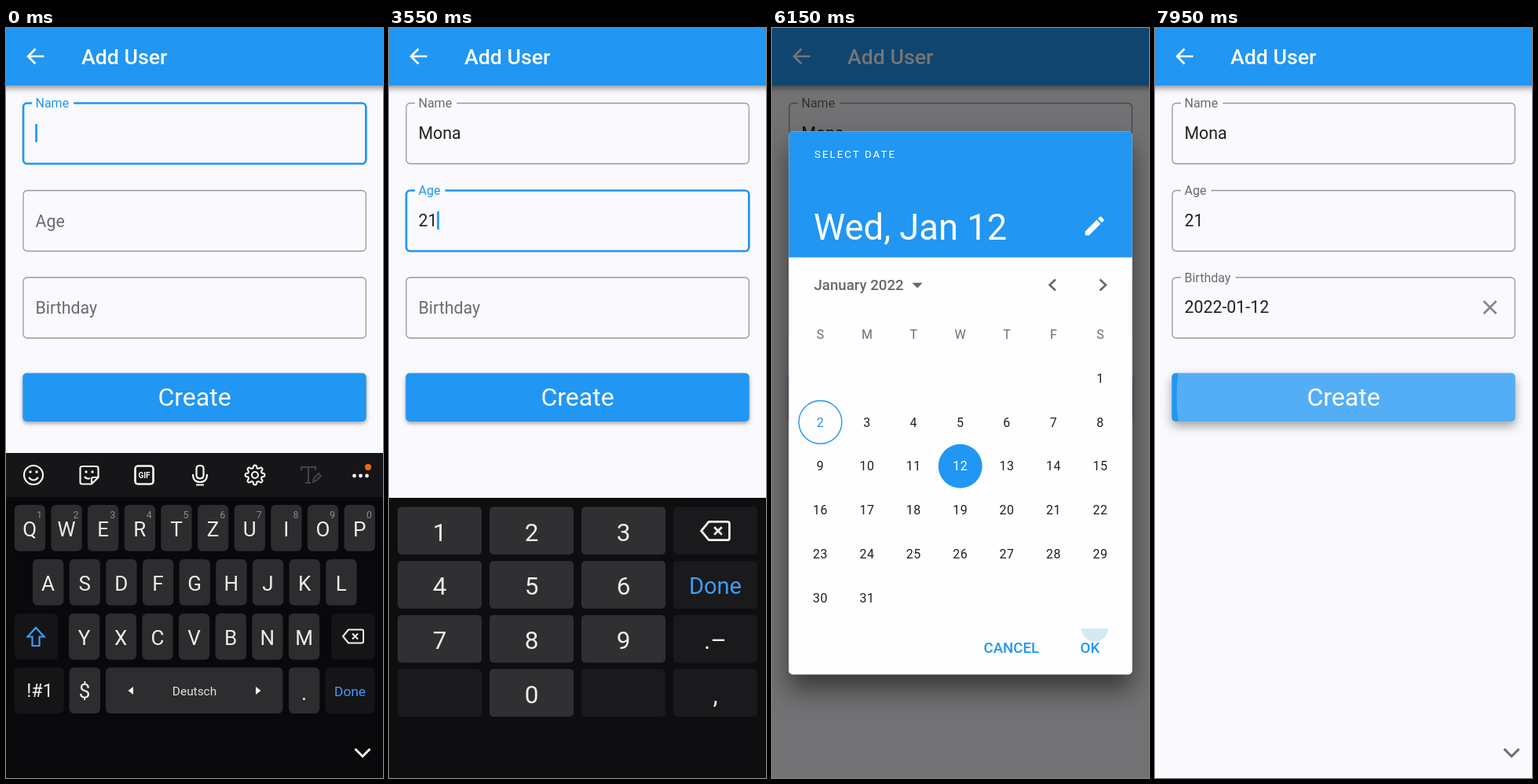
These frames come from a looping animation (480 by 953 pixels, 8000 ms). An HTML page with a canvas:

```html
<!DOCTYPE html>
<html lang="en">
<head>
<meta charset="utf-8">
<title>Add User</title>
<style>
html, body { margin: 0; height: 100%; overflow: hidden; background: #faf9fd; }
canvas { display: block; width: 100vw; height: 100vh; }
</style>
</head>
<body>
<canvas id="stage" width="480" height="953"></canvas>
<script>
const c = document.getElementById('stage').getContext('2d');
const BLUE = '#2196f3', BG = '#faf9fd', INK = '#212121', GREY = '#6c6b6e';
const LOOP = 8000, NAME = 'Mona', AGE = '21';
const KEY = '#2d2c2f', DARK_KEY = '#151417', HELD = '#5f5f61';

// Each press: key, down, up
const letterPresses = [['m', 60, 200], ['o', 500, 620], ['n', 900, 1020], ['a', 1230, 1350]];
const digitPresses = [['2', 2480, 2550], ['1', 2780, 2850]];
const TAP_AGE = 1700, OPEN = 3600, PICK = 4880, CLOSE = 6160, PRESS = 7050;
const cursorResets = [0, 200, 620, 1020, 1350, TAP_AGE, 2550, 2850, 3500];

const lerp = (a, b, p) => a + (b - a) * p;
const ramp = (t, from, to) => Math.min(1, Math.max(0, (t - from) / (to - from)));
const easeOut = p => 1 - (1 - p) ** 2;
const easeInOut = p => p * p * (3 - 2 * p);
const typed = (presses, t) => presses.filter(p => t >= p[2]).length;
const heldKey = (presses, t, linger = 0) => (presses.find(p => t >= p[1] && t < p[2] + linger) || [])[0];

function setFont(size, weight = 400, spacing = 0) {
  c.font = `${weight} ${size}px Roboto, sans-serif`;
  c.letterSpacing = spacing + 'px';
}
// y is the middle of the capital letters
function text(s, x, y, size, color, align = 'left', weight = 400, spacing = 0) {
  setFont(size, weight, spacing);
  c.textAlign = align;
  c.fillStyle = color;
  c.fillText(s, x, y + size * 0.355);
}
function width(s, size) {
  setFont(size);
  return c.measureText(s).width;
}
function box(x, y, w, h, r, color) {
  c.beginPath();
  c.roundRect(x, y, w, h, r);
  c.fillStyle = color;
  c.fill();
}
function disc(x, y, r, color) {
  c.beginPath();
  c.arc(x, y, r, 0, 7);
  c.fillStyle = color;
  c.fill();
}
function ring(x, y, r, color, w) {
  c.beginPath();
  c.arc(x, y, r, 0, 7);
  c.strokeStyle = color;
  c.lineWidth = w;
  c.stroke();
}
function path(d, x, y, color, w) {
  c.save();
  c.translate(x, y);
  c.strokeStyle = color;
  c.lineWidth = w;
  c.stroke(new Path2D(d));
  c.restore();
}
function fillPath(d, x, y, color, scale = 1) {
  c.save();
  c.translate(x, y);
  c.scale(scale, scale);
  c.fillStyle = color;
  c.fill(new Path2D(d));
  c.restore();
}
function shadow(color, blur, dy, draw) {
  c.save();
  c.shadowColor = color;
  c.shadowBlur = blur;
  c.shadowOffsetY = dy;
  draw();
  c.restore();
}
function layer(alpha, draw) {
  if (alpha <= 0) return;
  c.save();
  c.globalAlpha = alpha;
  draw();
  c.restore();
}

function field(top, label, value, focused, float, t, composing) {
  const color = focused ? BLUE : GREY;
  c.beginPath();
  c.roundRect(22, top + 0.5, 436.3, 77, 5);
  c.strokeStyle = focused ? BLUE : '#99989b';
  c.lineWidth = focused ? 2.7 : 1.3;
  c.stroke();
  if (float) {
    c.fillStyle = BG;
    c.fillRect(33, top - 2, (width(label, 16) + 10.5) * float, 5);
  }
  text(label, 37.5, lerp(top + 39, top + 0.5, float), lerp(21.33, 16, float), color);
  const mid = top + 38, end = 37.5 + width(value, 21.33);
  text(value, 37.5, mid, 21.33, INK);
  if (composing && value) {
    c.fillStyle = INK;
    c.fillRect(37.5, mid + 9.5, end - 37.5, 1.3);
  }
  const reset = cursorResets.filter(r => r <= t).pop();
  if (focused && (t - reset) % 1000 < 500) {
    c.fillStyle = BLUE;
    c.fillRect(end - 0.3, mid - 11, 2.7, 23);
  }
}

function createButton(t) {
  const p = ramp(t, PRESS, LOOP), lift = ramp(t, PRESS, PRESS + 200);
  shadow('rgba(0,0,0,.35)', lerp(5, 13, lift), lerp(2.5, 6, lift),
    () => box(21.3, 438.5, 437.4, 61.5, 5, BLUE));
  if (t >= PRESS) {
    c.save();
    c.beginPath();
    c.roundRect(21.3, 438.5, 437.4, 61.5, 5);
    c.clip();
    const e = easeOut(p);
    disc(lerp(290, 252, e), 469, lerp(66, 225, e),
      `rgba(255,255,255,${0.23 * ramp(t, PRESS - 10, PRESS + 75)})`);
    c.restore();
  }
  text('Create', 240, 469, 32, '#fff', 'center');
}

function form(t) {
  c.fillStyle = BG;
  c.fillRect(0, 0, 480, 953);
  shadow('rgba(0,0,0,.45)', 8, 3, () => {
    c.fillStyle = BLUE;
    c.fillRect(-10, -10, 500, 83);
  });
  path('M11 0H-9M0 -9.5L-9.5 0L0 9.5', 37.5, 36, '#fff', 2.6);
  text('Add User', 96, 37, 26.67, '#fff', 'left', 500);

  const onName = t < TAP_AGE, onAge = !onName && t < OPEN;
  field(95, 'Name', NAME.slice(0, typed(letterPresses, t)), onName, 1, t, onName);
  field(206, 'Age', AGE.slice(0, typed(digitPresses, t)), onAge,
    easeInOut(ramp(t, TAP_AGE, TAP_AGE + 200)), t);
  const dated = t >= CLOSE;
  field(316.5, 'Birthday', dated ? '2022-01-12' : '', false, easeOut(ramp(t, CLOSE, CLOSE + 172)), t);
  if (dated) path('M-8 -8L8 8M8 -8L-8 8', 426.5, 355, '#858487', 2.5);
  createButton(t);
  if (t >= 7950) chevronDown('#6b6a6d');
}

const chevronDown = color => path('M-9.5 -5L0 4.5L9.5 -5', 454, 921, color, 3);

function backspace(x, y, s) {
  c.save();
  c.translate(x, y);
  c.scale(s, s);
  path('M-13 0L-6 -8.5H11Q13 -8.5 13 -6.5V6.5Q13 8.5 11 8.5H-6ZM-1 -3.5L6 3.5M6 -3.5L-1 3.5', 0, 0, '#f2f2f2', 2);
  c.restore();
}

function toolbar() {
  const y = 568, w = '#f4f4f4';
  ring(35, y, 12, w, 2.2);
  disc(31, y - 4, 1.8, w);
  disc(39, y - 4, 1.8, w);
  path('M-6 3Q0 10 6 3', 35, y, w, 2);
  path('M-9 -11H9Q11.5 -11 11.5 -8.5V3L3 11.5H-9Q-11.5 11.5 -11.5 9V-8.5Q-11.5 -11 -9 -11M11 3H5Q3 3 3 5V11M-6 2Q-3 6 1 4', 106, y, w, 2.2);
  disc(102, y - 4, 1.7, w);
  disc(110, y - 4, 1.7, w);
  c.beginPath();
  c.roundRect(164.5, y - 11.5, 23, 23, 4);
  c.stroke();
  path('M-11.5 -8V8Q-11.5 11.5 -8 11.5H8Q11.5 11.5 11.5 8V-8Q11.5 -11.5 8 -11.5H-8Q-11.5 -11.5 -11.5 -8', 176, y, w, 2.2);
  text('GIF', 176, y, 10, w, 'center', 700);
  path('M-4.5 -8Q-4.5 -12 0 -12Q4.5 -12 4.5 -8V0Q4.5 4.5 0 4.5Q-4.5 4.5 -4.5 0ZM-9 -1Q-9 9 0 9Q9 9 9 -1M-5 12.5H5', 247, y, w, 2.2);
  c.beginPath();
  for (let i = 0; i <= 72; i++) {
    const a = i * Math.PI / 36, r = 10.7 + 1.7 * Math.tanh(2.5 * Math.cos(8 * a));
    c.lineTo(317 + r * Math.cos(a), y + r * Math.sin(a));
  }
  c.lineWidth = 2.1;
  c.stroke();
  ring(317, y, 4, w, 2.1);
  path('M-12 -6V-10H6V-6M-3 -10V10M-7 10H0M3 9L4 4L10 -2L13 1L7 7Z', 388, y, '#454447', 2);
}

function dots() {
  for (const x of [443.5, 451.5, 459.5]) disc(x, 569, 2.4, '#f4f4f4');
}

function letterKeyboard(t) {
  c.fillStyle = '#09080b';
  c.fillRect(0, 540, 480, 413);
  c.fillStyle = '#161518';
  c.fillRect(0, 540, 480, 56);
  const upper = t < 250;
  if (t < 300) {
    toolbar();
    disc(461, 558, 4.2, '#e8690b');
  } else {
    path('M5 -8L-4 0L5 8', 28, 567, '#f4f4f4', 2.3);
    [NAME, 'Email', 'Moni'].forEach((s, i) => text(s, 117.5 + i * 121.7, 569, 22.7, '#f4f4f4', 'center'));
  }
  dots();

  const held = heldKey(letterPresses, t), popped = heldKey(letterPresses, t, 60);
  let popup;
  [['qwertzuiop', 10.7], ['asdfghjkl', 34], ['yxcvbnm', 80]].forEach(([row, left], r) => {
    const y = 606 + r * 69;
    [...row].forEach((ch, i) => {
      const x = left + i * 46.65, s = upper ? ch.toUpperCase() : ch;
      box(x, y, 39.3, 58.7, 6, ch === held ? HELD : KEY);
      text(s, x + 19.6, y + (upper ? 31 : 30), upper ? 26 : 27.5, '#ececec', 'center');
      if (!r) text((i + 1) % 10, x + 31.7, y + 12.5, 12.5, '#8b8a8d', 'center');
      if (ch === popped) popup = [s, x + 19.6, y];
    });
  });
  for (const [x, y, w, color] of [[10.7, 744, 55.5, DARK_KEY], [414, 744, 55.3, DARK_KEY],
    [10.7, 812.5, 63, DARK_KEY], [80.5, 812.5, 39.5, KEY], [127, 812.5, 225.5, KEY],
    [360, 812.5, 39.3, KEY], [406.7, 812.5, 62.6, DARK_KEY]]) box(x, y, w, 58.5, 6, color);
  path('M0 -11.5L10.5 0H4.5V11.5H-4.5V0H-10.5Z', 38, 773.5, upper ? '#3d9df5' : '#f2f2f2', 2.2);
  backspace(442, 773, 1);
  text('!#1', 43, 842, 23.5, '#f2f2f2', 'center');
  text('$', 100, 842, 26, '#ececec', 'center');
  text('Deutsch', 240, 842.5, 15.4, '#e2e2e2', 'center');
  text('.', 379.5, 844, 27, '#ececec', 'center');
  text('Done', 438, 842.5, 17.3, '#3d9df5', 'center');
  fillPath('M3 -5L-3.5 0L3 5Z', 159, 842, '#fff');
  fillPath('M-3 -5L3.5 0L-3 5Z', 321, 842, '#fff');
  chevronDown('#f4f4f4');
  if (popup) {
    const [s, x, y] = popup;
    box(x - 36, y - 98, 72, 90, 8, '#161518');
    text(s, x, y - 53, 40, '#fff', 'center');
  }
}

function numberKeyboard(t) {
  c.fillStyle = '#0e0d10';
  c.fillRect(0, 597, 480, 356);
  const held = heldKey(digitPresses, t);
  ['1', '2', '3', '<', '4', '5', '6', 'Done', '7', '8', '9', '.–', '', '0', '', ','].forEach((s, i) => {
    const x = 11 + (i % 4) * 117, y = 608.5 + Math.floor(i / 4) * 68.7, digit = /\d/.test(s);
    box(x, y, 107, 60.5, 5, s === held ? HELD : digit ? '#302f32' : '#1a191c');
    if (s === '<') backspace(x + 53.5, y + 30.5, 1.38);
    else text(s, x + 53.5, y + 32, s === 'Done' ? 29 : 31.5, s === 'Done' ? '#3d9df5' : '#ececec', 'center');
  });
}

function keyboards(t) {
  const hide = ramp(t, 3700, 3900);
  if (hide === 1) return;
  c.save();
  c.translate(0, 356 * hide * hide);
  if (t > 1950) numberKeyboard(t);
  layer(1 - ramp(t, 1950, 2200), () => letterKeyboard(t));
  c.restore();
}

const PENCIL = 'M3 17.25V21h3.75L17.81 9.94l-3.75-3.75L3 17.25zM20.71 7.04c.39-.39.39-1.02 0-1.41l-2.34-2.34c-.39-.39-1.02-.39-1.41 0l-1.83 1.83 3.75 3.75 1.83-1.83z';

function dialog(t) {
  const inset = 358 * (1 - easeOut(ramp(t, 3980, 4130)));
  const h = Math.min(690, 953 - inset - 63), top = (953 - inset - h) / 2;
  const head = top + 160, bottom = top + h, row = (h - 298.5) / 7;
  const picked = t >= PICK ? 12 : 2;

  shadow('rgba(0,0,0,.5)', 32, 19, () => box(21.3, top, 437.4, h, 5, '#fefdff'));
  box(21.3, top, 437.4, 160, [5, 5, 0, 0], BLUE);
  text('SELECT DATE', 54, top + 28.5, 13.33, '#fff', 'left', 400, 2);
  text(picked === 12 ? 'Wed, Jan 12' : 'Sun, Jan 2', 53, top + 121, 45.33, '#fff');
  fillPath(PENCIL, 394.7, top + 104, '#fff', 4 / 3);

  text('January 2022', 53.5, head + 35, 18.67, '#68676a', 'left', 500);
  fillPath('M-6.7 -3.3H6.7L0 3.4Z', 185, head + 35.5, '#68676a');
  path('M4 -7L-3.5 0L4 7', 357, head + 35, '#68676a', 2.6);
  path('M-4 -7L3.5 0L-4 7', 421.5, head + 35, '#68676a', 2.6);

  const colX = i => 61.5 + 59.4 * i, rowY = i => head + 69.5 + row * (i + 0.5);
  [...'SMTWTFS'].forEach((s, i) => text(s, colX(i), rowY(0), 16, GREY, 'center'));
  for (let day = 1; day <= 31; day++) {
    const x = colX((day + 5) % 7), y = rowY(1 + Math.floor((day + 5) / 7));
    let color = INK;
    if (day === 12 && t > 4700 && t < PICK) {
      disc(x, y, row / 2 * lerp(0.3, 1, easeOut(ramp(t, 4700, PICK))), 'rgba(0,0,0,.08)');
    }
    if (day === picked) {
      disc(x, y, row / 2, BLUE);
      color = '#fff';
      if (day === 12) disc(x, y, row / 2, `rgba(255,255,255,${0.15 * (1 - ramp(t, PICK, 5300))})`);
    } else if (day === 2) {
      ring(x, y, row / 2 - 0.6, BLUE, 1.4);
      color = BLUE;
    }
    text(day, x, y, 16, color, 'center', 400, 0.5);
  }

  if (t > 6000) {
    c.beginPath();
    c.arc(411, bottom - 58.5, 17 * ramp(t, 5950, 6100), 0, Math.PI);
    c.fillStyle = '#d3eaf3';
    c.fill();
  }
  text('CANCEL', 269.5, bottom - 34, 18.67, BLUE, 'left', 500);
  text('OK', 392.5, bottom - 34, 18.67, BLUE, 'left', 500);
}

function draw(now) {
  const t = now % LOOP;
  const shown = ramp(t, OPEN, OPEN + 150) * (1 - ramp(t, CLOSE, CLOSE + 80));
  form(t);
  layer(shown, () => {
    c.fillStyle = 'rgba(0,0,0,.54)';
    c.fillRect(0, 0, 480, 953);
    dialog(t);
  });
  keyboards(t);
  requestAnimationFrame(() => draw(performance.now() - start));
}
const start = performance.now();
draw(0);
</script>
</body>
</html>
```
